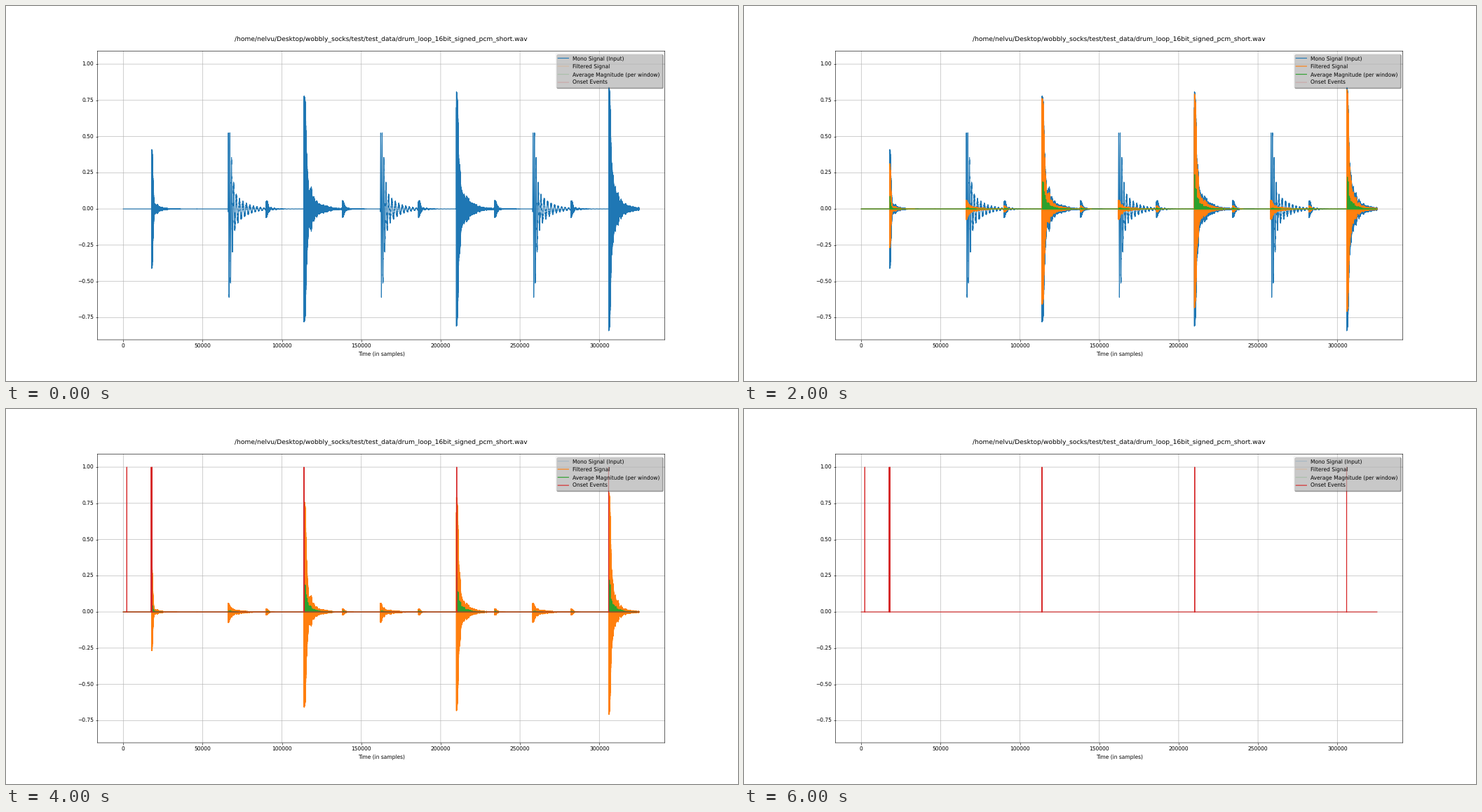
These frames come from a looping animation (1044x536 px, 7000 ms). A matplotlib script:

```python
import numpy as np
import matplotlib.pyplot as plt
from matplotlib.animation import FuncAnimation

WIDTH, HEIGHT = 1044, 536
DPI = WIDTH / 19.2
TOTAL = 325000            # samples in the clip
STEP = 5                  # samples between plotted points
UNIT = 442                # samples covered by one pixel column
WINDOW, WINDOW_START = 512, 192

plt.rcParams.update({
    "font.family": "DejaVu Sans",
    "text.hinting": "none",
    "path.snap": False,
    "agg.path.chunksize": 10000,
})

x = np.arange(0, TOTAL, STEP)
carrier = np.sin(2 * np.pi * x / 60)

TAP = 17850
KICKS = [(113900 + 96000 * i, 0.78 + 0.03 * i) for i in range(3)]
SNARES = [66000 + 96000 * i for i in range(3)]
HATS = [90000 + 48000 * i for i in range(5)]


def envelope(u, fast, tail, slow):
    """Short flat-topped attack that runs into an exponential tail."""
    t = np.maximum(u, 0)
    body = (1.2 - tail) * np.exp(-(t / fast) ** 2) + tail * np.exp(-t / slow)
    return np.where(u >= 0, np.minimum(1, body), 0)


def burst(start, peak, fast, tail, slow, down=1.0):
    """Dense noise below an envelope; `down` scales its lower half."""
    u = (x - start) / UNIT
    rng = np.random.default_rng(start)
    nodes = np.arange(0, TOTAL / UNIT, 0.8)
    dips = np.interp(u, nodes, np.sqrt(rng.random(nodes.size)))
    gain = 1 - 0.6 * dips * np.clip(u / 4, 0, 1) ** 2
    side = np.where(carrier > 0, 1, down)
    return peak * side * carrier * gain * envelope(u, fast, tail, slow)


def boom(start):
    """Low ringing tone that slows down while it fades."""
    u = (x - start) / UNIT
    period = 2 + 3 * (1 - np.exp(-(u / 10) ** 2))
    phase = np.cumsum(np.where(u >= 0, STEP / UNIT / period, 0))
    ring = np.sin(2 * np.pi * phase) - 0.07 + 0.1 * carrier * np.clip(u / 8, 0, 1)
    return 0.565 * ring * envelope(u, 5.5, 0.35, 16)


def mono_signal():
    y = burst(TAP, 0.41, 2, 0.3, 7)
    y += sum(burst(start, peak, 4, 0.5, 12) for start, peak in KICKS)
    y += sum(boom(start) for start in SNARES)
    y += sum(burst(start, 0.055, 4, 0.5, 5) for start in HATS)
    return x, y


def filtered_signal():
    y = burst(TAP, 0.31, 1.8, 0.2, 7, down=0.86)
    y += sum(burst(start, 0.98 * peak, 4, 0.45, 10, down=0.86)
             for start, peak in KICKS)
    y += sum(burst(start, 0.06, 2, 0.9, 12, down=1.2) for start in SNARES)
    y += sum(burst(start, 0.02, 4.5, 0.1, 3) for start in HATS)
    return x, y


def spikes(positions, heights):
    """Zero line with a one-sample peak at each position."""
    px = np.stack([positions - 1, positions, positions + 1], axis=1).ravel()
    py = np.stack([0 * heights, heights, 0 * heights], axis=1).ravel()
    return np.r_[0, px, TOTAL], np.r_[0, py, 0]


def window_levels():
    pos = np.arange(WINDOW_START, TOTAL, WINDOW)

    def level(start, peak, *shape):
        return peak * envelope((pos - start) / UNIT, *shape)

    y = level(TAP, 0.09, 2, 0.2, 5)
    y += sum(level(start, 0.3 * peak, 3, 0.6, 8) for start, peak in KICKS)
    y += sum(level(start, 0.008, 8, 0.2, 12) for start in SNARES)
    y += sum(level(start, 0.007, 4, 0.1, 3) for start in HATS)
    return spikes(pos, y * np.random.default_rng(4).uniform(0.6, 1, pos.size))


def onset_events():
    pos = WINDOW_START + WINDOW * np.array([4, 34, 35, 222, 410, 597])
    return spikes(pos, np.ones(pos.size))


fig, ax = plt.subplots(figsize=(WIDTH / DPI, HEIGHT / DPI), dpi=DPI)
ax.set_title("/home/nelvu/Desktop/wobbly_socks/test/test_data/"
             "drum_loop_16bit_signed_pcm_short.wav\n")
ax.set_xlabel("Time (in samples)")
ax.grid(True)

series = {
    "Mono Signal (Input)": mono_signal(),
    "Filtered Signal": filtered_signal(),
    "Average Magnitude (per window)": window_levels(),
    "Onset Events": onset_events(),
}
lines = [ax.plot(*data, label=label)[0] for label, data in series.items()]
ax.set_xlim(-0.05 * TOTAL, 1.05 * TOTAL)
ax.set_ylim(-0.9033, 1.0906)

legend = ax.legend(loc="upper right", fancybox=True, shadow=True)
legend.get_frame().set_alpha(0.4)
handles = legend.get_lines()


def update(frame):
    """Switch the series on one by one, then off in the same order."""
    for i, (line, handle) in enumerate(zip(lines, handles)):
        shown = i <= frame < i + 4
        line.set_visible(shown)
        handle.set_alpha(1 if shown else 0.2)
    return lines + handles


anim = FuncAnimation(fig, update, frames=7, interval=1000,
                     repeat=True, repeat_delay=0, blit=False)
plt.show()
```
